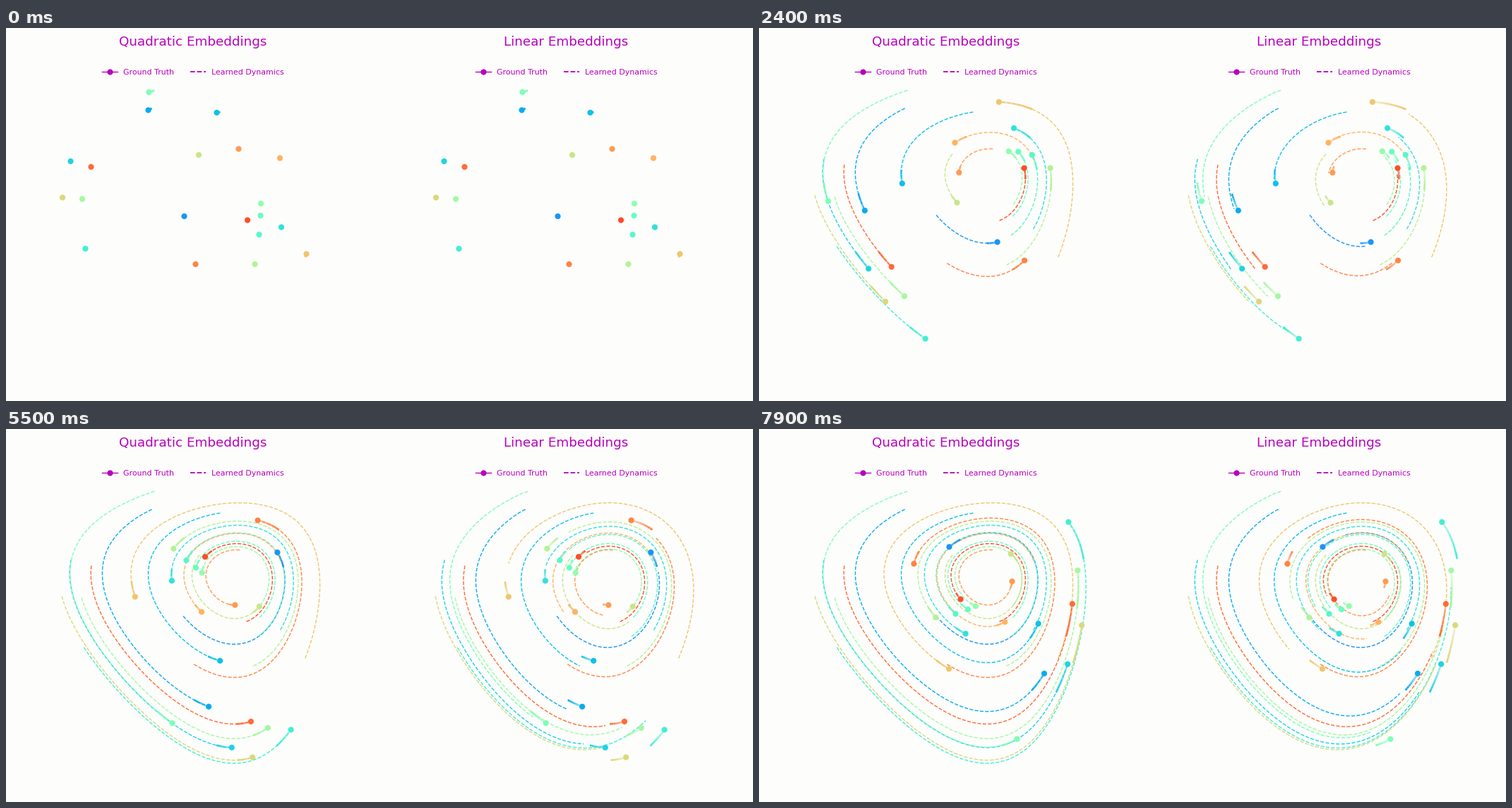
Recreate the animation shown at these times as a matplotlib script. Size 1058 px wide and 529 px high, loop 8 s.

```python
import numpy as np
import matplotlib.pyplot as plt
from matplotlib.animation import FuncAnimation
from matplotlib.collections import LineCollection

W, H, DPI = 1058, 529, 100
PX = 72 / DPI                     # points per pixel
PANEL = W / 2
FRAMES, INTERVAL = 80, 100
DT, STEPS = 0.05, 2               # integration step, steps per frame
TRAIL = 8                         # trail length in steps
CENTER, SCALE = np.array([325, 210]), np.array([129, 92])
SPEED_X, SPEED_Y = 58.2, 79.5     # pixels per second
PURPLE, PAPER = "#b800bc", "#fdfdfc"
plt.rcParams["font.family"] = "DejaVu Sans"

START = np.array([
    (252.5, 267), (201.5, 116.5), (298.5, 120), (91.5, 189), (390, 282.5),
    (112.5, 313), (358.5, 293), (360.5, 266), (202.5, 91), (361, 249),
    (108, 242.5), (352.5, 335), (273, 180), (80, 240.5), (425.5, 320.5),
    (388, 184.5), (329.5, 171.5), (268.5, 335), (120.5, 197), (342, 272.5)])
COLORS = plt.get_cmap("rainbow")(np.linspace(0.2, 0.9, len(START)))


def log_coordinates(p):
    u, v = ((p - CENTER) / SCALE).T
    return u, -v


def true_field(p):
    """Damped Lotka-Volterra flow in log coordinates, in pixels per second."""
    gu, gv = np.expm1(log_coordinates(p))
    return np.column_stack([-SPEED_X * gv - 4.2 * gu,
                            -SPEED_Y * gu + 1.4 * gv])


def soft_growth(z):
    return np.where(z > 0, z + 0.3 * z * z, np.expm1(np.minimum(z, 0)))


def linear_field(p):
    """Imperfect fit: weak growth, a drift to the left, a lift at the bottom."""
    u, v = log_coordinates(p)
    drift = 3 + 9 * np.maximum(u, 0) ** 2
    lift = np.maximum(-v, 0) ** 3
    return np.column_stack([-SPEED_X * soft_growth(v) - drift,
                            -SPEED_Y * soft_growth(u) - lift])


def advance(field, p, h):
    k1 = field(p)
    k2 = field(p + h / 2 * k1)
    k3 = field(p + h / 2 * k2)
    k4 = field(p + h * k3)
    return p + h / 6 * (k1 + 2 * k2 + 2 * k3 + k4)


def paths(field):
    """Positions by step; START is step 1, one step after the line begins."""
    points = [advance(true_field, START, -DT), START]
    while len(points) < FRAMES * STEPS:
        points.append(advance(field, points[-1], DT))
    return np.array(points)


truth, linear = paths(true_field), paths(linear_field)

fig = plt.figure(figsize=(W / DPI, H / DPI), dpi=DPI, facecolor=PAPER)
ax = fig.add_axes([0, 0, 1, 1])
ax.set(xlim=(0, W), ylim=(H, 0))
ax.axis("off")


class Panel:
    def __init__(self, left, title, learned):
        self.truth = truth + (left, 0)
        self.learned = learned + (left, 0)
        self.draw_header(left, title)
        self.dashes = [ax.plot([], [], "--", color=c, lw=1.4 * PX, zorder=2)[0]
                       for c in COLORS]
        self.trails = LineCollection([], linewidths=2.7 * PX, zorder=3)
        ax.add_collection(self.trails, autolim=False)
        self.dots = ax.scatter(*self.truth[1].T, s=(8.2 * PX) ** 2, c=COLORS,
                               linewidths=0, zorder=4)

    def draw_header(self, left, title):
        ax.text(left + PANEL / 2, 25, title, ha="center", color=PURPLE,
                fontsize=18.33 * PX)
        ax.plot([left + 135.5, left + 157.5], [62, 62], color=PURPLE,
                lw=1.4 * PX)
        ax.plot(left + 146.5, 62, "o", color=PURPLE, ms=8.2 * PX, mew=0)
        ax.plot([left + 260.7, left + 282.7], [62, 62], "--", color=PURPLE,
                lw=1.8 * PX)
        for x, label in ((166.3, "Ground Truth"), (291, "Learned Dynamics")):
            ax.text(left + x, 66, label, color=PURPLE, fontsize=11 * PX)

    def update(self, now):
        for i, line in enumerate(self.dashes):
            line.set_data(*self.learned[:now + 1, i].T)
        tail = self.truth[max(0, now - TRAIL):now + 1]
        segments = np.stack([tail[:-1], tail[1:]], axis=2)
        count = len(segments)
        # Trails are strongest at their far end.
        rgba = np.tile(COLORS, (count, 1, 1))
        rgba[..., 3] = np.linspace(1, 0.35, count)[:, None]
        self.trails.set_segments(list(segments.reshape(-1, 2, 2)))
        self.trails.set_color(rgba.reshape(-1, 4))
        self.dots.set_offsets(self.truth[now])


panels = [Panel(0, "Quadratic Embeddings", truth),
          Panel(PANEL, "Linear Embeddings", linear)]


def update(frame):
    for panel in panels:
        panel.update(frame * STEPS + 1)
    return []


anim = FuncAnimation(fig, update, frames=FRAMES, interval=INTERVAL,
                     repeat=True, repeat_delay=0, blit=False)
plt.show()
```
